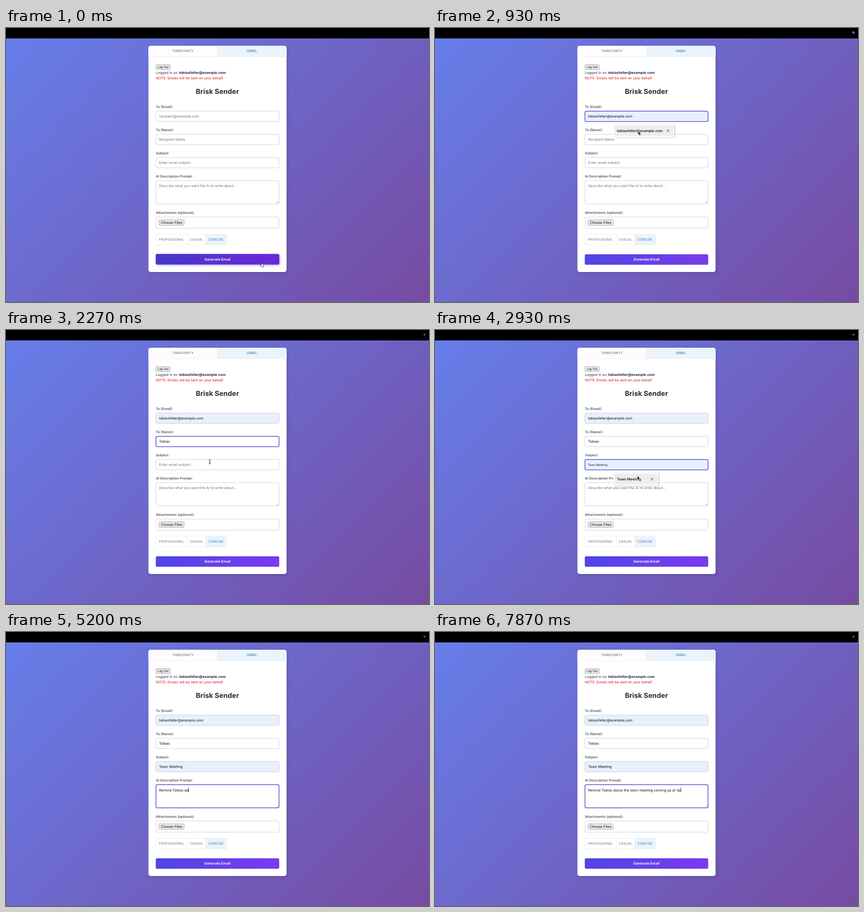
These frames come from a looping animation (928 px wide and 603 px high, 8000 ms). An HTML page:

```html
<!DOCTYPE html>
<html lang="en">
<head>
<meta charset="utf-8">
<title>Brisk Sender</title>
<style>
html, body { margin: 0; width: 100%; height: 100%; overflow: hidden; background: #000; }
svg { display: block; width: 928px; height: 603px; }
text {
  font: 400 7.72px Inter, "Open Sans", sans-serif;
  text-rendering: geometricPrecision;
  white-space: pre;
}
.mid { text-anchor: middle; }
.tab { font-size: 7.15px; font-weight: 500; fill: #777; }
.tone { font-size: 7.3px; fill: #777; }
.active { fill: #3b82c4; }
.title { font-size: 15.2px; font-weight: 700; fill: #2d2d2d; }
.label { font-size: 7.43px; font-weight: 600; fill: #555; }
.hint { fill: #757575; }
.value { fill: #111; }
.preview { font-size: 6.3px; fill: #111; }
.item { font-weight: 600; fill: #222; }
.send { font-size: 7.85px; font-weight: 600; fill: #fff; }
.native { font-family: "Liberation Sans", Arial, sans-serif; fill: #000; }
.nativeBox { fill: #efefef; stroke: #767676; stroke-width: .7; }
.box { fill: #fff; stroke: #d0d0d2; }
.filled { fill: #e8f0fe; stroke: #d0d4dc; }
.focus { fill: none; stroke: #5f52d6; stroke-width: 1.5; }
.caret { fill: #111; }
.toneBox { fill: #fff; stroke: #e6eaef; stroke-width: .8; }

#cursor { animation: move 8s linear infinite; }
@keyframes move {
  0%      { transform: translate(561px, 516px); }
  .875%   { transform: translate(552px, 478px); }
  1.625%  { transform: translate(538px, 420px); }
  2.5%    { transform: translate(516px, 340px); }
  3.375%  { transform: translate(494px, 262px); }
  4.125%  { transform: translate(478px, 205px); }
  5%      { transform: translate(469px, 179px); }
  5.875%  { transform: translate(461px, 186px); }
  6.625%  { transform: translate(455px, 195px); }
  7.5%    { transform: translate(452px, 200px); }
  8.375%  { transform: translate(449px, 216px); }
  9.125%  { transform: translate(447px, 226px); }
  10%, 11.625% { transform: translate(446px, 227px); }
  13.375% { transform: translate(448px, 238px); }
  15%     { transform: translate(450px, 247px); }
  17.5%   { transform: translate(450px, 248.5px); }
  19.125% { transform: translate(447px, 262px); }
  20.875% { transform: translate(445px, 273px); }
  21.625%, 26.125% { transform: translate(445px, 275px); }
  28.375% { transform: translate(447px, 290px); }
  30%     { transform: translate(448px, 298px); }
  31.625%, 35.4% { transform: translate(448px, 300px); }
  36.5%   { transform: translate(444px, 320.5px); }
  38.375% { transform: translate(444px, 325px); }
  40.875% { transform: translate(447px, 340px); }
  42.5%   { transform: translate(450px, 345px); }
  45.875% { transform: translate(451px, 346px); }
  48.375%, 100% { transform: translate(446px, 320px); }
}
#dot { transform-box: fill-box; transform-origin: center; animation: pulse 8s linear infinite; }
@keyframes pulse {
  0% { transform: scale(.3); opacity: .4; }
  4%, 18.75% { transform: none; opacity: 1; }
  21.6%, 100% { transform: scale(.72); opacity: 1; }
}
#lift { animation: lift 8s linear infinite; }
@keyframes lift {
  0%, 1% { transform: translateY(-.6px); }
  4.8%, 100% { transform: none; }
}
#hover { animation: hover 8s linear infinite; }
@keyframes hover {
  0%, 1% { opacity: 1; }
  4.8%, 100% { opacity: 0; }
}
</style>
</head>
<body>
<svg viewBox="0 0 928 603">
  <defs>
    <linearGradient id="sky" gradientUnits="userSpaceOnUse" x1="87" y1="-64" x2="841" y2="690">
      <stop stop-color="#667eea"/><stop offset="1" stop-color="#764ba2"/>
    </linearGradient>
    <linearGradient id="idle" gradientUnits="userSpaceOnUse" x1="391" y1="436" x2="537.6" y2="583">
      <stop stop-color="#4f46e5"/><stop offset="1" stop-color="#7c3aed"/>
    </linearGradient>
    <linearGradient id="dark" gradientUnits="userSpaceOnUse" x1="391" y1="436" x2="537.6" y2="583">
      <stop stop-color="#4338ca"/><stop offset="1" stop-color="#6d28d9"/>
    </linearGradient>
    <filter id="cardShadow" x="-10%" y="-10%" width="120%" height="120%">
      <feDropShadow dy="2" stdDeviation="3" flood-opacity=".16"/>
    </filter>
    <filter id="popShadow" x="-20%" y="-40%" width="140%" height="200%">
      <feDropShadow dy="1" stdDeviation="1.8" flood-opacity=".22"/>
    </filter>
    <filter id="glow" x="-10%" y="-50%" width="120%" height="220%">
      <feDropShadow dy="2" stdDeviation="2.5" flood-color="#4f46e5" flood-opacity=".4"/>
    </filter>
    <clipPath id="cardClip"><rect x="312.5" y="39" width="303" height="498" rx="5"/></clipPath>
  </defs>

  <rect width="928" height="603"/>
  <rect y="23" width="928" height="580" fill="url(#sky)"/>
  <circle id="dot" cx="918" cy="10" r="2.8" fill="#5b57ee"/>

  <rect x="312.5" y="39" width="303" height="498" rx="5" fill="#fff" filter="url(#cardShadow)"/>
  <g clip-path="url(#cardClip)">
    <rect x="312" y="39" width="152" height="24" fill="#fdfdfd"/>
    <rect x="464" y="39" width="152" height="24" fill="#ebf4fb"/>
    <path d="M312 63.2H616M464 39V63" stroke="#e2e8f0" stroke-width=".8"/>
  </g>
  <text class="tab mid" x="388.2" y="53.3">THIRD PARTY</text>
  <text class="tab mid active" x="539.6" y="53.3">ORBEL</text>

  <rect class="nativeBox" x="329" y="80.8" width="31.3" height="10.4" rx="1.5"/>
  <text class="native mid" x="344.6" y="88.4" style="font-size:6.73px">Log Out</text>
  <text x="328.7" y="100.7" fill="#4a5568" style="font-weight:500">Logged in as:</text>
  <text x="379.8" y="100.7" fill="#222b3a" style="font-weight:700">tobiasfelter@example.com</text>
  <text x="328.7" y="113" fill="#dc1010">NOTE: Emails will be sent on your behalf</text>
  <text class="title mid" x="463.8" y="144.6">Brisk Sender</text>

  <g id="form"></g>
  <path d="M593.5 385.8L597.8 381.5M596 385.8L597.8 384" stroke="#777" stroke-width=".7"/>
  <text class="value" id="typed" x="335.7" y="350.7"></text>
  <rect class="caret" id="caret" y="342.3" width=".9" height="10.4" data-on="3400 9000"/>

  <text class="label" x="328.7" y="408.5">Attachments (optional):</text>
  <rect class="box" x="329" y="416" width="270" height="24.5" rx="3"/>
  <rect class="nativeBox" x="335.6" y="422.3" width="55" height="11.9" rx="1.6"/>
  <text class="native mid" x="363.1" y="431.2" style="font-size:8.1px">Choose Files</text>

  <rect class="toneBox" x="329" y="454" width="69" height="23.3"/>
  <rect class="toneBox" x="398" y="454" width="40.5" height="23.3"/>
  <rect class="toneBox" x="438.5" y="454" width="45" height="23.3" style="fill:#ebf4fb;stroke:#dde9f3"/>
  <text class="tone mid" x="363.2" y="467.9">PROFESSIONAL</text>
  <text class="tone mid" x="417.9" y="467.9">CASUAL</text>
  <text class="tone mid active" x="460.6" y="467.9">CONCISE</text>

  <g id="lift">
    <rect x="328.6" y="498" width="270.8" height="23" rx="3" fill="url(#idle)"/>
    <rect id="hover" x="328.6" y="498" width="270.8" height="23" rx="3" fill="url(#dark)" filter="url(#glow)"/>
    <text class="send mid" x="463.9" y="512.2">Generate Email</text>
  </g>

  <g id="popups"></g>

  <g id="cursor">
    <path data-on="0 100" d="M-.9 .3Q0-1 .9 .3V4L4 4.8Q5 5.2 4.8 6.4L4 9.8H-.6L-3 6.3Q-3.3 4.8-2 5.3L-.9 6.3Z"
      fill="#fff" stroke="#111" stroke-width=".9" stroke-linejoin="round"/>
    <g id="arrows"></g>
    <g id="beams"></g>
  </g>
</svg>
<script>
const LOOP = 8000;
const $ = id => document.getElementById(id);

// data-on = "start end fadeIn fadeOut" in ms
const fields = [
  { y: 183, label: 'To (Email):', hint: 'recipient@example.com', value: 'tobiasfelter@example.com',
    focus: [560, 1310], popup: 660, pick: 700, done: 930, fill: '700 9000', caret: '570 700', wide: 134 },
  { y: 234, label: 'To (Name):', hint: 'Recipient Name', value: 'Tobias',
    focus: [1310, 2330], popup: 1340, pick: 1600, done: 1730, fill: '1600 1730', caret: '1310 1600', wide: 99 },
  { y: 285, label: 'Subject:', hint: 'Enter email subject', value: 'Team Meeting',
    focus: [2330, 3400], popup: 2400, pick: 2880, done: 3070, fill: '2880 9000', caret: '2340 2730', wide: 99 },
  { y: 336, h: 51, label: 'AI Description Prompt:', hint: 'Describe what you want the AI to write about...',
    focus: [3400, 9000], pick: 4000 }
];

const box = (cls, y, h, on) =>
  `<rect class="${cls}" x="329" y="${y}" width="270" height="${h}" rx="3" data-on="${on}"/>`;
const line = (cls, y, on, str, x = 335.7) =>
  `<text class="${cls}" x="${x}" y="${y}" data-on="${on}">${str}</text>`;

function fieldMarkup(f) {
  const h = f.h || 22.7, base = f.y + 14.4;
  let s = line('label', f.y - 7.5, '0 9000', f.label, 328.7) + box('box', f.y, h, '0 9000');
  if (f.fill) s += box('filled', f.y, h, f.fill);
  s += box('focus', f.y, h, `${f.focus.join(' ')} 260 260`) + line('hint', base, `0 ${f.pick}`, f.hint);
  if (f.value) {
    s += line('preview', base, `${f.pick} ${f.done}`, f.value) + line('value', base, `${f.done} 9000`, f.value);
    s += `<rect class="caret" x="335.4" y="${f.y + 6.2}" width=".9" height="10.4" data-on="${f.caret}"/>`;
  }
  return s;
}

function popupMarkup(f) {
  const y = f.y + 28.6, cx = 391 + f.wide - 14, cy = y + 14.5;
  return `<g data-on="${f.popup} ${f.done} 50 200">
    <path d="M394.5 ${y}H401l4-3 4 3H${387 + f.wide}q3.5 0 3.5 3.5v22q0 3.5-3.5 3.5H394.5q-3.5 0-3.5-3.5v-22q0-3.5 3.5-3.5z"
      fill="#fafafa" filter="url(#popShadow)"/>
    <g data-on="${f.pick} 9000">
      <rect x="394" y="${y + 3}" width="${f.wide - 6}" height="23" rx="3" fill="#ededee"/>
      <path d="M${cx - 2.7} ${cy - 2.7}l5.4 5.4m0-5.4l-5.4 5.4" stroke="#333" stroke-width=".9"/>
    </g>${line('item', y + 17.3, '0 9000', f.value, 399)}</g>`;
}

const arrow = on => `<path data-on="${on}" d="M0 0V8.6L2 6.8 3.4 9.9 4.9 9.2 3.5 6.2H6.2Z"
  stroke="#fff" stroke-width=".7" stroke-linejoin="round"/>`;
const beam = on => `<g data-on="${on}" fill="none">
  <path d="M-2.3-4.6Q0-4.6 0-3V3Q0 4.6-2.3 4.6M2.3-4.6Q0-4.6 0-3M0 3Q0 4.6 2.3 4.6M-1.2 1H1.2" stroke="#222" stroke-width="1"/></g>`;

$('form').innerHTML = fields.map(fieldMarkup).join('');
$('popups').innerHTML = fields.filter(f => f.popup).map(popupMarkup).join('');
$('arrows').innerHTML = ['100 500', '640 1110', '1450 2200', '2880 3230', '3780 3930'].map(arrow).join('');
$('beams').innerHTML = ['500 640', '1110 1450', '2200 2880', '3230 3780'].map(beam).join('');

const timed = [...document.querySelectorAll('[data-on]')].map(el => [el, ...el.dataset.on.split(' ').map(Number)]);

// Each burst: first key, last key, characters reached
const prompt = 'Remind Tobias about the team meeting coming up at 3p';
const bursts = [
  [4000, 4000, 1], [4130, 4470, 8], [4600, 4870, 15], [5130, 5130, 16], [5270, 5870, 28],
  [5930, 6270, 36], [6530, 6670, 40], [6930, 7130, 45], [7400, 7870, 52]
];
const keyTimes = [];
for (const [from, to, end] of bursts) {
  const start = keyTimes.length, gaps = Math.max(1, end - start - 1);
  for (let i = start; i < end; i++) keyTimes.push(from + (to - from) * (i - start) / gaps);
}

const ramp = (t, at, span) => span ? Math.min(1, Math.max(0, (t - at) / span)) : +(t >= at);

function render(t) {
  for (const [el, from, to, fadeIn, fadeOut] of timed)
    el.setAttribute('opacity', ramp(t, from, fadeIn) - ramp(t, to, fadeOut));
  const count = keyTimes.filter(k => k <= t).length;
  $('typed').textContent = prompt.slice(0, count);
  $('caret').setAttribute('x', 335.4 + (count ? $('typed').getComputedTextLength() : 0));
}

let t0;
function frame(now) {
  t0 ??= now;
  render((now - t0) % LOOP);
  requestAnimationFrame(frame);
}
render(0);
requestAnimationFrame(frame);
</script>
</body>
</html>
```
